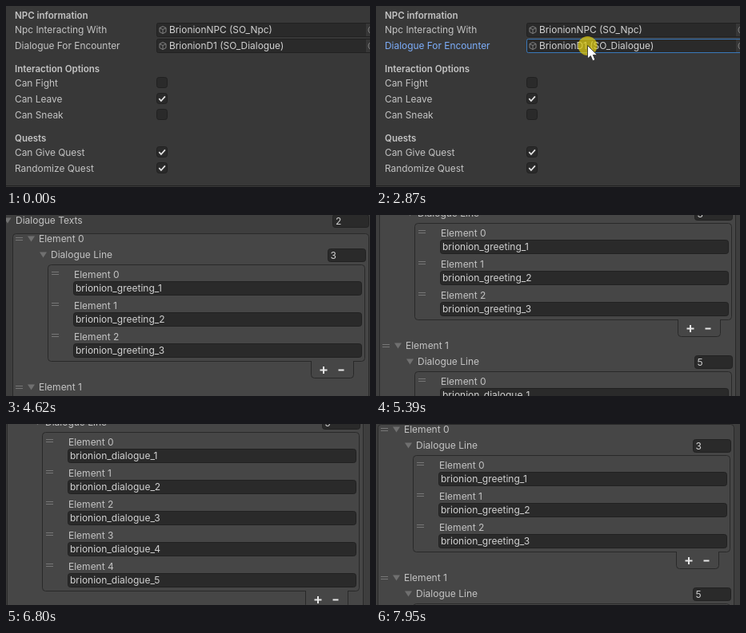
Write an HTML page that moves like this. It is 455 px wide and 227 px high and loops after 8000 ms.

```html
<!DOCTYPE html>
<html lang="en">
<head>
<meta charset="utf-8">
<title>Inspector</title>
<style>
  html, body { margin: 0; width: 100%; height: 100%; overflow: hidden; background: #383838; }
  svg { display: block; width: 455px; height: 227px; }
  text { font: 12px Inter, sans-serif; fill: #c4c4c4; white-space: pre; }
  #encounter text { font-size: 11.9px; }
  #encounter .bold { font-weight: 600; font-size: 11.5px; }
  .value { fill: #d2d2d2; }
  .field { fill: #2a2a2a; stroke: #212121; }
  .list { fill: #464646; stroke: #292929; }
  .grip { stroke: #777; }
  .caret { fill: #707070; }
  .icon { fill: none; stroke: #8c8c8c; stroke-width: .9; }
  .tick { fill: none; stroke: #e4e4e4; stroke-width: 1.7; }
  .sign { stroke: #e6e6e6; stroke-width: 2; }
  .focused #label { fill: #7daefb; }
  .focused #focus { stroke: #3a79bb; }
</style>
</head>
<body>
<svg id="stage" viewBox="0 0 455 227"></svg>
<script>
const LOOP = 8000;
const CLICK = 2870, OPEN = 3060;
const ENTER = 1190, ARRIVE = 1810;

const text = (x, y, str, cls = '', id = '') =>
  `<text x="${x}" y="${y + 4.3}" class="${cls}" id="${id}">${str}</text>`;
const box = (x, y, w, h, cls = 'field', r = 3, id = '') =>
  `<rect x="${x + .5}" y="${y + .5}" width="${w - 1}" height="${h - 1}" rx="${r}" class="${cls}" id="${id}"/>`;
const path = (d, cls) => `<path d="${d}" class="${cls}"/>`;
const caret = (x, y) => path(`M${x - 4.5} ${y - 3.5}h9l-4.5 7z`, 'caret');
const grip = (x, y) => path(`M${x} ${y + .5}h9m-9 3h9`, 'grip');

function objectField(y, value, id) {
  return box(188, y - 9, 280, 18, 'field', 2, id) +
    path(`M196 ${y - 4.5}l4 2v5l-4 2l-4 -2v-5zm-4 2l4 2l4 -2m-4 2v5`, 'icon') +
    text(204, y, value, 'value') +
    `<rect x="450" y="${y - 8}" width="8" height="16" fill="#373737"/>` +
    `<circle cx="458" cy="${y}" r="5" class="icon"/>`;
}

function toggle(y, label, on) {
  return text(11, y, label) + box(188, y - 8, 14, 14) +
    (on ? path(`M191.3 ${y - .8}l2.6 2.8l5 -5.6`, 'tick') : '');
}

function encounterPanel() {
  return '<rect width="455" height="227" fill="#383838"/>' +
    text(11, 12, 'NPC information', 'bold') +
    text(11, 30, 'Npc Interacting With') + objectField(30, 'BrionionNPC (SO_Npc)', '') +
    text(11, 50, 'Dialogue For Encounter', '', 'label') +
    objectField(50, 'BrionionD1 (SO_Dialogue)', 'focus') +
    text(11, 79, 'Interaction Options', 'bold') +
    toggle(97, 'Can Fight', false) + toggle(117, 'Can Leave', true) + toggle(137, 'Can Sneak', false) +
    text(11, 166, 'Quests', 'bold') +
    toggle(184, 'Can Give Quest', true) + toggle(204, 'Randomize Quest', true) +
    '<rect y="225" width="455" height="1" fill="#222"/>';
}

// One entry of the outer list, positioned by the centre of its heading.
function dialogueEntry(y, index, prefix, count) {
  const top = y + 32, height = 5 + 39 * count, bottom = top + height;
  let out = grip(12, y - 2) + caret(31.5, y) + text(41, y, `Element ${index}`) +
    caret(46.5, y + 20) + text(56, y + 20, 'Dialogue Line') +
    box(402, y + 12, 48, 17) + text(405.5, y + 21, count, 'value') +
    path(`M381.5 ${bottom - .5}h53v17q0 4 -4 4h-45q-4 0 -4 -4z`, 'list') +
    box(52, top, 397, height, 'list', 4) +
    `<rect x="382" y="${bottom - 2}" width="52" height="3" fill="#464646"/>` +
    path(`M392.5 ${bottom + 10.5}h9m-4.5 -4.5v9m18.5 -4.5h7`, 'sign');
  for (let i = 0; i < count; i++) {
    const row = y + 45 + i * 39;
    out += grip(57, row - 4) + text(85, row, `Element ${i}`) +
      box(84, row + 8, 361, 18) + text(87, row + 17, `${prefix}_${i + 1}`, 'value');
  }
  return out;
}

function dialoguePanel() {
  return '<rect width="455" height="227" fill="#3e3e3e"/><g id="content">' +
    caret(2, 7) + text(12, 7, 'Dialogue Texts') +
    box(408, -1, 46, 17) + text(412, 7.5, 2, 'value') +
    box(8, 23, 446, 480, 'list', 4) +
    dialogueEntry(30, 0, 'brionion_greeting', 3) +
    dialogueEntry(216, 1, 'brionion_dialogue', 5) + '</g>';
}

document.getElementById('stage').innerHTML =
  `<g id="encounter">${encounterPanel()}
    <g id="pointer"><circle cy=".5" r="12" fill="#dccb15" opacity=".74"/>
    <path d="M0 0v16.5l3.8 -3.5l2.6 6.2l3 -1.3l-2.6 -6h5.2z" fill="#fff" stroke="#222" stroke-width=".8"/></g>
  </g><g id="dialogue">${dialoguePanel()}</g>`;

const part = Object.fromEntries(['encounter', 'dialogue', 'content', 'pointer']
  .map(id => [id, document.getElementById(id)]));

// Time, horizontal and vertical scroll position.
const scroll = [
  [3060, 0, 33], [3320, 0, 33], [3610, 0, 15], [4270, 0, 15], [4620, 0, 0],
  [5390, -4, -52], [6100, -7, -178], [6800, -7, -238], [7000, -7, -238],
  [7410, -5, -135], [7950, -6, -23], [8000, -6, -14]
];

function slope(i, axis) {
  const a = scroll[i - 1], b = scroll[i], c = scroll[i + 1];
  if (!a || !c) return 0;
  const before = b[axis] - a[axis], after = c[axis] - b[axis];
  return before * after > 0 ? (before + after) / (c[0] - a[0]) : 0;
}

function scrollAt(time, axis) {
  let i = 0;
  while (i < scroll.length - 2 && time >= scroll[i + 1][0]) i++;
  const a = scroll[i], b = scroll[i + 1], span = b[0] - a[0];
  const u = Math.max(0, (time - a[0]) / span), v = 1 - u;
  return a[axis] * v * v * (1 + 2 * u) + b[axis] * u * u * (3 - 2 * u) +
    span * u * v * (slope(i, axis) * v - slope(i + 1, axis) * u);
}

function pointerAt(time) {
  const u = Math.min(1, Math.max(0, (time - ENTER + 35) / (ARRIVE - ENTER + 35)));
  const e = u * u * (3 - 2 * u), v = 1 - e;
  const curve = (a, b, c) => a * v * v + 2 * b * v * e + c * e * e;
  return [curve(452, 20, 264.5), curve(188, 80, 49.5)];
}

const show = (el, visible) => el.setAttribute('display', visible ? 'inline' : 'none');
const move = (el, x, y) => el.setAttribute('transform', `translate(${x} ${y})`);

function render(time) {
  show(part.encounter, time < OPEN);
  show(part.dialogue, time >= OPEN);
  show(part.pointer, time >= ENTER);
  part.encounter.classList.toggle('focused', time >= CLICK);
  move(part.pointer, ...pointerAt(time));
  move(part.content, Math.round(scrollAt(time, 1)), Math.round(scrollAt(time, 2)));
}

const start = performance.now();
function tick() {
  render((performance.now() - start) % LOOP);
  requestAnimationFrame(tick);
}
tick();
</script>
</body>
</html>
```
